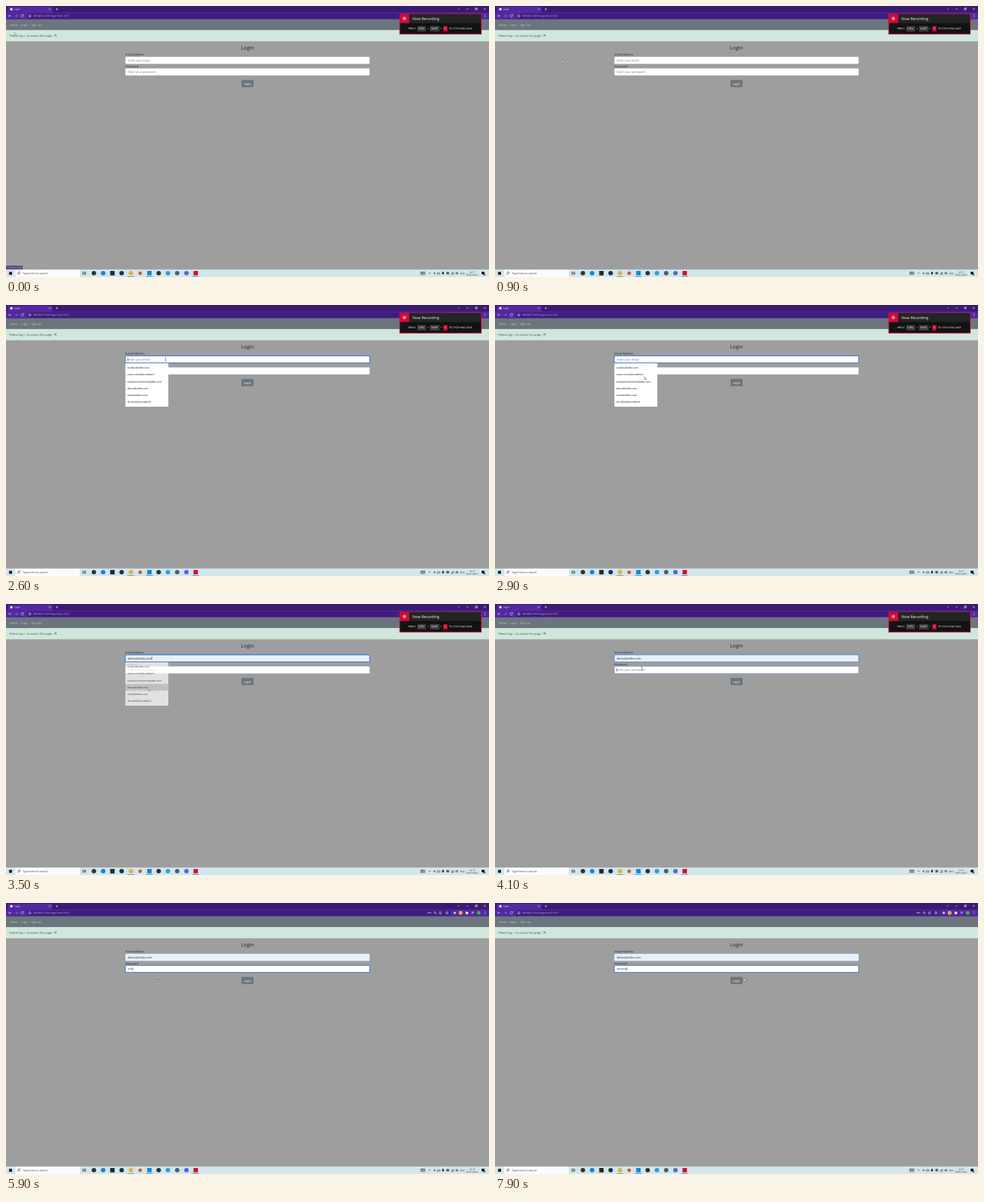
An HTML page for the animation above (8000 ms loop, 720 px wide and 405 px high).

```html
<!DOCTYPE html>
<html lang="en">
<head>
<meta charset="utf-8">
<title>Login</title>
<style>
html, body { margin: 0; width: 100%; height: 100%; overflow: hidden; background: #9e9e9e; }
svg { display: block; width: 720px; height: 405px; }
text { font: 4.3px "Open Sans", "Noto Sans", sans-serif; fill: #212529; text-rendering: geometricPrecision; white-space: pre; }
.mid { text-anchor: middle; }
.icon { fill: none; stroke: #e8def8; stroke-width: .6; }
.dark { fill: none; stroke: #222; stroke-width: .6; }
.ring { fill: none; stroke: #2f74d0; stroke-width: 1.1; }
</style>
</head>
<body>
<svg viewBox="0 0 720 405">
  <rect width="720" height="405" fill="#9e9e9e"/>

  <g id="browser">
    <rect width="720" height="10" fill="#3b1a72"/>
    <path d="M1 10q1.5 0 1.5-2V3q0-2 2-2h63q2 0 2 2v5q0 2 1.5 2z" fill="#5229a0"/>
    <rect y="9.7" width="720" height="10.3" fill="#5229a0"/>
    <rect x="30.5" y="11" width="632" height="7.8" rx="3.9" fill="#3f1d7c"/>
    <circle cx="8" cy="4.8" r="1.9" fill="#f0eaff"/>
    <text x="12.5" y="6.2" style="font-size:3.3px;fill:#fff">Login</text>
    <path class="icon" d="M64 3.5l2.4 2.4m0-2.4L64 5.9M74 4.8h3.6m-1.8-1.8v3.6M673.6 4l1.2 1.2L676 4M686.5 4.5h3M699.5 3.7h2.3v2.3h-2.3zM700.3 3.7v-.8h2.3v2.3h-.8M712.3 3l2.8 2.8m0-2.8l-2.8 2.8"/>
    <path class="icon" d="M8 14.8H4m1.8-1.8L4 14.8l1.8 1.8M26.2 13.8a2 2 0 1 0 .1 1.8m0-3v1.5h-1.5"/>
    <path class="icon" d="M13.3 14.8h4m-1.8-1.8l1.8 1.8-1.8 1.8" opacity=".5"/>
    <circle class="icon" cx="35.5" cy="14.8" r="1.8"/>
    <path class="icon" d="M35.5 14.4v1.4"/>
    <text x="40" y="16.1" style="font-size:3.75px;fill:#fff">127.0.0.1<tspan fill="#b8a4dc">:5000/login?next=%2F</tspan></text>
    <path class="icon" d="M631 14.5h2.5v1m-4.6-1a.9.9 0 1 1 1.8 0a.9.9 0 1 1-1.8 0M638 13h2m-1 0v2m-1 0l2-2m-.3 3.5l1-2 1 2M647 13.2h-.8v3.2h3.2v-1M647.5 15q0-1.5 2-1.5m-.8-.9l.9.9-.9.9M657.3 12.6l.6 1.4 1.5.1-1.2 1 .4 1.5-1.3-.8-1.3.8.4-1.5-1.2-1 1.5-.1zM694.2 13.2h3.4m-3.4 1.3h3.4m-3.4 1.3h1.8"/>
    <circle cx="669" cy="14.7" r="1.7" fill="#c3d2f2"/>
    <circle cx="677.7" cy="14.7" r="2.9" fill="#f2a33b"/>
    <path d="M685.2 13.3h1q.5-1.6 1.2 0h1.3v1.2q1.3.6 0 1.2v1.1h-3.5z" fill="#f0eaff"/>
    <circle cx="704.7" cy="14.7" r="2.7" fill="#45b52e"/>
    <path d="M714 12.4v.9m0 1v.9m0 1v.9" stroke="#fff" stroke-width=".9"/>
  </g>

  <g id="page">
    <rect y="20" width="720" height="16" fill="#6c757d"/>
    <g id="nav"></g>
    <rect y="36" width="720" height="16.7" fill="#d1e7dd"/>
    <path d="M0 36.2h720M0 52.5h720" stroke="#badbcc" stroke-width=".4"/>
    <text x="5" y="46.2" style="fill:#245a42">Please log <tspan fill="#a08a4a">in</tspan> to access this page.</text>
    <path d="M72.1 42.2l3.4 3.4m0-3.4l-3.4 3.4" stroke="#31443b" stroke-width=".7"/>
    <text class="mid" x="360" y="65" style="font-size:7.6px;font-weight:500">Login</text>
    <text x="178" y="74">Email Address</text>
    <rect id="emailBox" x="178" y="76" width="364" height="10.4" rx="1" fill="#fff" stroke="#ced4da" stroke-width=".3"/>
    <text id="email" x="181.5" y="82.8"></text>
    <text x="178" y="91.5">Password</text>
    <rect x="178" y="93.3" width="364" height="10.4" rx="1" fill="#fff" stroke="#ced4da" stroke-width=".3"/>
    <text id="hint" x="181.5" y="100.1" style="fill:#6c757d">Enter your password</text>
    <g id="dots" fill="#212529"></g>
    <rect id="emailRing" class="ring" x="177.8" y="75.9" width="364.4" height="10.6" rx="1"/>
    <rect id="passRing" class="ring" x="177.8" y="93.2" width="364.4" height="10.6" rx="1"/>
    <rect id="caret" width=".45" height="5" fill="#111"/>
    <rect x="351" y="110.6" width="18" height="10.6" rx="1" fill="#6c757d"/>
    <text class="mid" x="360" y="117.5" style="fill:#fff">Login</text>
  </g>

  <g id="menu">
    <rect x="178" y="87" width="64" height="65" fill="#fff"/>
    <rect id="pick" x="178" y="119.4" width="64" height="10.1" fill="#cfcfcf"/>
  </g>

  <g id="status">
    <rect y="388" width="25" height="5.8" fill="#594784"/>
    <text x="1.5" y="392.2" style="font-size:3.3px;fill:#b9a9da">127.0.0.1:5000</text>
  </g>

  <g id="overlay">
    <rect x="587" y="12" width="121.5" height="30" fill="#121212" stroke="#d00c34"/>
    <rect x="587.5" y="12.5" width="120.5" height="13" fill="#242424"/>
    <rect x="587" y="12" width="14" height="13.5" fill="#d00c34"/>
    <circle cx="593.8" cy="18.7" r="2.1" fill="none" stroke="#fff" stroke-width=".7"/>
    <circle cx="593.8" cy="18.7" r=".9" fill="#fff"/>
    <text x="606" y="20.9" style="font-size:5.65px;fill:#fff">Now Recording</text>
    <rect x="613" y="30" width="13.2" height="8" rx=".8" fill="#3d3d3d"/>
    <rect x="632" y="30" width="14.3" height="8" rx=".8" fill="#3d3d3d"/>
    <rect x="652" y="30" width="6" height="8" rx=".8" fill="#d00c34"/>
    <g id="keys"></g>
  </g>

  <g id="taskbar">
    <rect y="393.8" width="720" height="11.2" fill="#d2e6ec"/>
    <rect x="4.6" y="397.3" width="4.4" height="4.4" fill="#1a1a1a"/>
    <rect x="14" y="394" width="96" height="11" fill="#fafcfd"/>
    <circle class="dark" cx="19.6" cy="398.8" r="1.5"/>
    <path class="dark" d="M18.5 400l-1.5 1.6"/>
    <text x="25" y="401" style="font-size:4.1px;fill:#444">Type here to search</text>
    <path class="dark" d="M114.6 397.6h3.5v3.5h-3.5zM119 397.5v1m0 .6v2M114.6 399.3h3.5"/>
    <g id="apps"></g>
    <path class="dark" d="M618.3 397.5h6v3.8h-6zM619 398.8h4.6m-4.6 1h4.6M629.8 400l1.6-1.6 1.6 1.6M637 399.4h1.2l1.2-1.4v3l-1.2-1.4M643 400.8q-1-2 1-2 1-1.4 2 0 1.8.3.9 2zM664 401.2q0-3 3-3.2v3.2zM670.5 398.6h1l1-1v3.6l-1-1h-1zM673.2 398.2q1 1.2 0 2.4"/>
    <rect x="650.3" y="397.3" width="2.4" height="4" rx="1" fill="#222"/>
    <rect x="656.5" y="397.5" width="4" height="3.6" fill="#575d54"/>
    <text class="mid" x="680.2" y="400.8" style="font-size:3.4px">ENG</text>
    <text class="mid" x="695" y="398.6" style="font-size:3.2px">22.15</text>
    <text class="mid" x="695" y="403.2" style="font-size:3.2px">06/01/2022</text>
    <path d="M709 397.3h4.3v3.5h-2.5l-.9 1v-1h-.9z" fill="#111"/>
    <circle cx="713" cy="401.3" r="1.4" fill="#3b4045"/>
  </g>

  <g id="cursor">
    <path id="arrow" d="M0 0v4.3l1-.9.7 1.6.8-.3-.7-1.6h1.4z" fill="#fff" stroke="#222" stroke-width=".35"/>
    <path id="beam" d="M-.9-2.4H.9M0-2.4v4.8M-.9 2.4H.9" fill="none" stroke="#222" stroke-width=".5"/>
  </g>
</svg>
<script>
const $ = id => document.getElementById(id);

function add(parent, tag, attrs, text = "") {
  const el = document.createElementNS("http://www.w3.org/2000/svg", tag);
  for (const k in attrs) el.setAttribute(k, attrs[k]);
  el.textContent = text;
  return $(parent).appendChild(el);
}

const label = (parent, x, y, size, fill, text) =>
  add(parent, "text", { x, y, style: `font-size:${size}px;fill:${fill}` }, text);

[[5.5, "Home"], [22, "Login"], [37.5, "Sign Up"]]
  .forEach(([x, s]) => label("nav", x, 29.7, 4.3, "#c3c8b2", s));

[[599.5, "PRESS"], [614.8, "CTRL"], [627.9, "+"], [633.7, "SHIFT"],
 [647.8, "+"], [654, "E"], [660.3, "TO STOP AND SAVE"]]
  .forEach(([x, s]) => label("keys", x, 35.4, 3.85, "#fff", s));

const address = "demo@zelbo.com";
["nutbox@zelbo.com", "oskar.venlo@trundela.fi", "oskarparcelstores@zelbo.com",
 address, "oskar@zelbo.com", "ilo.venlo@trundela.fi"]
  .forEach((s, i) => label("menu", 181, 95.3 + i * 10.13, 3.65, "#111", s));

["#30343a", "#1684d8", "#25282c", "#17344f", "#e0b33b", "#d9542f",
 "#1686d0", "#28363c", "#2aa1da", "#44627a", "#5865d8", "#d5112f"]
  .forEach((fill, i) => {
    const x = 131 + i * 13.8;
    if (i == 2 || i == 6 || i == 11)
      add("apps", "rect", { x: x - 3.3, y: 396, width: 6.6, height: 6.6, fill });
    else add("apps", "circle", { cx: x, cy: 399.3, r: i == 5 ? 2.6 : 3.3, fill });
    if (i == 4 || i == 6 || i == 11)
      add("apps", "rect", { x: x - 5, y: 404.2, width: 10, height: .8, fill: "#2b80bd" });
  });

const keyTimes = [4700, 5000, 5300, 5700, 6300, 6500, 6700, 6900];
const bullets = keyTimes.map((_, i) =>
  add("dots", "circle", { cx: 182.5 + i * 1.84, cy: 98.6, r: .72 }));

// Cursor waypoints: time, x, y
const path = [
  [0, 12.5, 39], [100, 12.5, 39], [800, 99.5, 81], [1700, 99.5, 81], [1820, 186, 84],
  [2000, 237.8, 81], [2650, 237.8, 81], [3100, 212, 125.5], [3560, 212, 125.5],
  [3950, 219, 96], [4250, 219, 96], [4650, 225.5, 109], [7250, 225.5, 109],
  [7750, 371, 112.7], [8000, 371, 112.7]
];
const focusEmail = 2200, focusPass = 4050, preview = 3100;
const clamp = v => Math.max(0, Math.min(1, v));
const show = (id, on) => $(id).setAttribute("opacity", +on);

function cursorAt(t) {
  const i = path.findIndex(p => p[0] > t);
  const [t0, x0, y0] = path[i - 1], [t1, x1, y1] = path[i];
  const u = (t - t0) / (t1 - t0), e = u * u * (3 - 2 * u);
  return [x0 + (x1 - x0) * e, y0 + (y1 - y0) * e];
}

function draw(t) {
  const [x, y] = cursorAt(t);
  const menu = t < 2400 ? 0 : 1 - clamp((t - 3440) / 200);
  const overField = x > 178 && x < 542 && (y > 76 && y < 86.4 || y > 93.3 && y < 103.7 && !menu);
  $("cursor").setAttribute("transform", `translate(${x} ${y})`);
  show("arrow", !overField);
  show("beam", overField);

  show("status", 1 - clamp((t - 200) / 200));
  show("overlay", t < 4300);
  show("menu", menu);
  show("pick", t >= preview);

  const filled = t >= preview;
  $("email").textContent = filled ? address : "Enter your email";
  $("email").style.fill = filled ? "#212529" : "#6c757d";
  $("emailBox").setAttribute("fill", filled ? "#e8f0fe" : "#fff");
  const passFocus = clamp((t - focusPass) / 150);
  show("emailRing", clamp((t - focusEmail) / 150) * (1 - passFocus));
  show("passRing", passFocus);

  const typed = keyTimes.filter(k => k <= t).length;
  bullets.forEach((b, i) => b.setAttribute("opacity", +(i < typed)));
  show("hint", !typed);

  const inPass = t >= focusPass;
  const since = t - (typed ? keyTimes[typed - 1] : inPass ? focusPass : t >= 3440 ? 3440 : focusEmail);
  const end = inPass ? typed * 1.84 : t >= 3440 ? $("email").getComputedTextLength() : 0;
  $("caret").setAttribute("x", 181.4 + end);
  $("caret").setAttribute("y", inPass ? 96 : 78.7);
  show("caret", since >= 0 && since % 1000 < 500);
}

const start = performance.now();
function tick() {
  draw((performance.now() - start) % 8000);
  requestAnimationFrame(tick);
}
tick();
</script>
</body>
</html>
```
